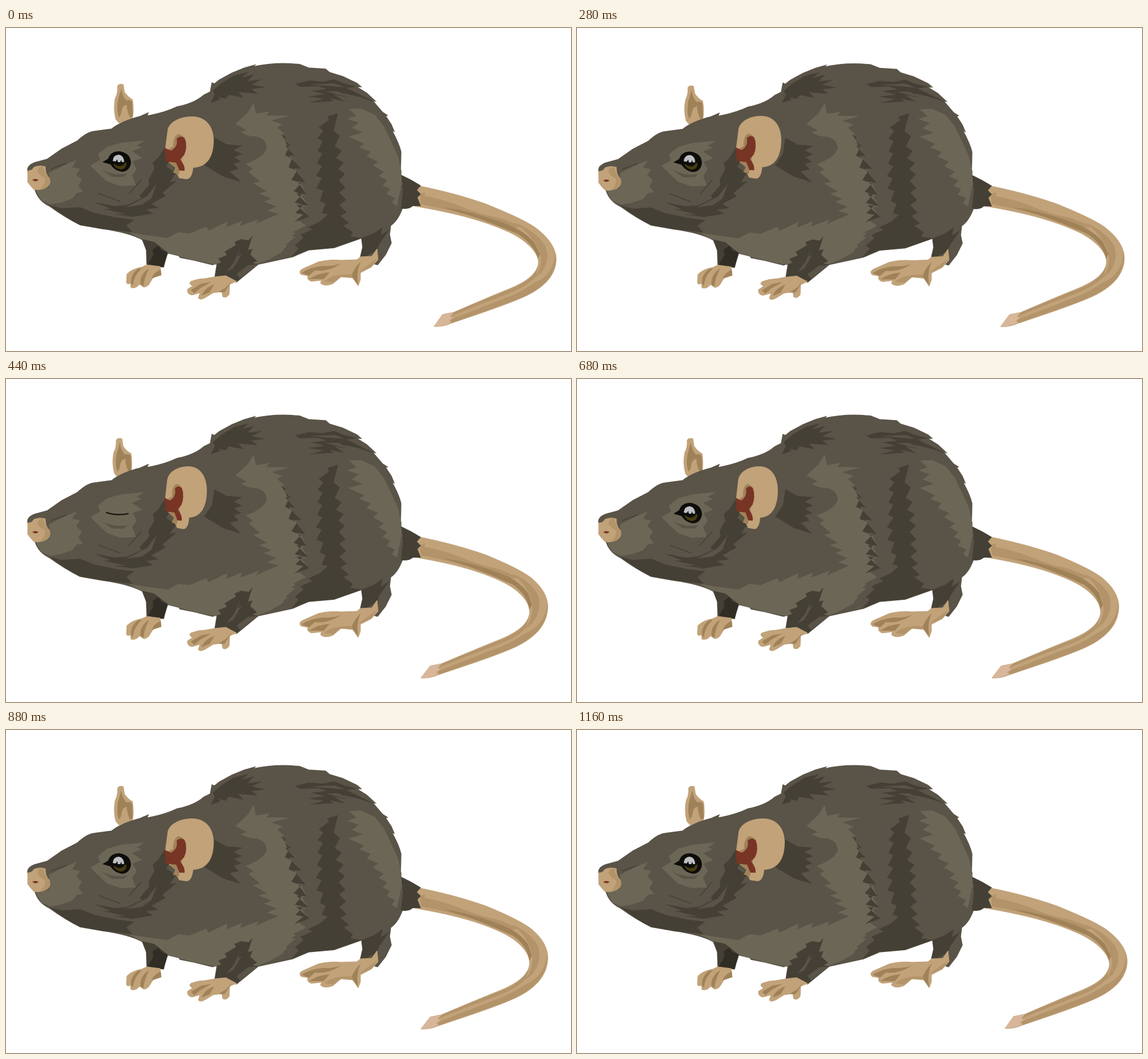
Animation of 990x566 px, one loop 1.2 s. Source, as an HTML page:

```html
<!DOCTYPE html>
<html lang="en">
<head>
<meta charset="utf-8">
<title>Rat</title>
<style>
html, body { margin: 0; width: 100%; height: 100%; overflow: hidden; background: #fff }
svg { display: block; width: 990px; height: 566px }
.mid { fill: #5a5347 }
.light { fill: #6c6656 }
.dark { fill: #454035 }
.deep { fill: #302d25 }
.tan { fill: #c1a279 }
.shade { fill: #a08259 }
.soft { fill: #b3946a }
.pink { fill: #d8b69a }
.red { fill: #783424 }
.coat { stroke: #5a5347; stroke-width: 1.5 }
.skin { stroke: #c1a279 }
.hair { fill: none; stroke: #454035; stroke-width: 1.5 }
</style>
</head>
<body>
<svg viewBox="0 0 990 566">
  <g id="tail">
    <path class="tan skin" d="M715,275 C757,283 800,294 840,308 C872,321 905,335 925,348 C952,367 965,388 964,408 C962,436 940,456 910,470 C872,487 825,502 781,517 Q765,524 750,523 L765,502 L785,498 C815,485 845,472 872,461 C911,446 930,432 933,412 C934,394 912,372 880,357 C832,335 775,322 715,312Z"/>
    <path class="soft" d="M725,291 L735,288 L733,294 Q775,302 808,317 L835,326 L866,333 L905,348 L890,350 Q858,340 838,336 L805,327 Q765,316 727,309Z"/>
    <path class="shade" d="M765,314 L790,318 Q832,327 868,340 Q904,352 925,375 L936,396 L932,404 Q926,380 897,361 Q852,342 808,327Z"/>
    <path class="soft" d="M890,340 Q928,356 944,380 Q955,405 939,428 L927,438 Q944,410 933,388 Q921,361 890,340Z"/>
    <path class="soft" d="M962,392 Q962,432 925,447 Q902,464 870,475 L779,511 L781,517 L885,480 Q929,465 951,440 Q967,416 962,392Z"/>
    <path class="soft" d="M780,505 Q827,485 873,468 Q914,453 929,435 L932,418 Q921,446 875,461 L785,498Z"/>
    <path class="pink" d="M750,523 L765,502 L785,498 L778,505 L783,508 L776,513 L780,516 Q765,524 750,523Z"/>
  </g>

  <g id="body">
  <g id="farEar">
    <path class="tan" d="M192,161 Q187,142 191,124 Q196,115 195,103 Q198,97 206,100 L208,113 Q214,122 222,126 Q225,145 222,159 L198,168Z"/>
    <path class="shade" d="M202,107 Q204,121 211,128 Q217,126 221,130 L222,156 L217,158 Q211,143 212,136 Q203,135 202,151 L198,158 Q193,147 196,128Z"/>
  </g>

  <path class="mid coat" d="M38,251 Q37,242 50,237 L72,231 L98,213 L125,199 Q142,183 155,182 L185,178 Q203,164 235,156 L249,150 L247,155 Q277,150 300,139 Q330,133 346,119 L358,113 L361,97 L365,99 L374,92 L396,80 L418,71 L436,66 L433,69 Q473,60 515,65 L530,71 L560,73 L567,79 L590,86 L615,98 L622,104 L614,104 L632,115 L647,129 L642,128 L660,149 L668,154 L665,155 L675,170 L680,182 L676,180 Q689,204 692,218 L691,260 L697,310 Q688,338 674,347 L672,363 L675,378 L665,398 L651,416 L620,407 L625,385 L623,369 L575,386 L530,390 L502,402 L442,415 L404,446 L366,438 L370,413 L362,416 L330,408 L305,403 L303,400 L282,395 L276,420 L247,416 L246,390 L239,372 Q215,359 170,353 L130,346 Q105,334 76,313 Q57,304 51,285Z"/>

  <!-- snout, eye area and throat -->
  <path class="light" d="M75,255 L105,240 L124,232 L116,245 L130,248 L123,258 L133,267 L127,278 L135,288 L124,290 L116,300 L96,307 L77,310 L62,303 L52,286 L75,281 L77,267Z"/>
  <path class="light" d="M148,242 L165,232 L161,222 L177,209 L202,202 L243,198 L229,207 L238,210 L221,217 L239,229 L222,235 L229,248 L221,260 L228,277 L200,278 L177,270 L161,255Z"/>
  <path class="mid" d="M167,249 Q190,261 213,256 L206,262 L186,262Z"/>
  <path class="dark" d="M75,311 L97,317 L130,315 L155,325 L193,333 L225,337 L211,347 L222,359 L170,353 L130,346 Q105,334 75,311Z"/>
  <path class="dark" d="M278,211 L267,228 L257,237 L260,248 L250,266 L251,276 L234,295 L238,299 L213,311 L190,313 L154,306 L184,318 L170,318 L210,327 L188,327 L222,332 L258,326 L245,319 L267,316 L255,309 L280,295 L274,290 L299,269 L287,271 L298,255 L281,244 L288,230Z"/>
  <path class="mid" d="M210,315 L247,296 L264,274 L255,299 L238,311Z"/>
  <path class="hair" d="M79,248 L106,238 M162,291 L200,305 M237,267 L215,292"/>

  <!-- shoulder and belly -->
  <path class="light" d="M402,169 L423,150 L434,132 L438,151 L462,147 L456,154 L496,155 L465,163 L485,170 L475,175 L488,187 L481,188 L500,208 L491,208 L506,225 L498,226 L518,248 L507,248 L525,272 L516,271 L527,293 L518,295 L530,312 L518,315 L532,334 L514,339 L526,347 L503,359 L513,362 L490,381 L497,386 L462,406 L442,414 L370,416 L330,408 L282,395 L239,372 L215,359 L240,363 L283,369 L302,359 L322,361 L351,349 L355,356 L388,340 L386,350 L414,339 L410,348 L443,336 L438,344 L477,327 L457,321 L474,314 L452,305 L465,300 L443,291 L457,287 L433,273 L445,270 L425,253 L433,248 L420,239 Q452,228 457,211 Q455,194 438,191 Q425,192 411,183 L422,180Z"/>
  <path class="dark" d="M484,188 L490,192 L488,197 L500,208 L489,207 L506,225 L496,225 L518,248 L505,247 L525,272 L511,270 L527,293 L509,291 L530,312 L509,311 L532,332 L505,341 L521,328 L507,325 L521,311 L506,307 L518,293 L504,287 L517,273 L500,267 L510,251 L495,245 L501,230 L489,224 L495,211Z"/>
  <path class="mid" d="M532,331 L514,339 L526,347 L500,366 L511,367 L487,388 L479,406 L502,402 L530,388 L560,355Z"/>

  <!-- back and flank markings -->
  <path class="dark" d="M359,132 L366,117 L362,111 L377,98 L400,84 L425,78 L413,88 L435,82 L423,94 L449,91 L430,100 L455,105 L430,108 L441,116 L407,113 L416,123 L390,118 L385,125 L372,122 L376,126Z"/>
  <path class="dark" d="M507,99 L531,93 L555,95 L575,91 L592,98 L616,104 L596,106 L623,119 L647,131 L620,122 L592,115 L598,122 L575,118 L594,130 L567,124 L574,129 L531,132 L557,125 L529,121 L559,117 L535,111 L562,108 L547,103 L515,104Z"/>
  <path class="mid" d="M532,100 L576,98 L594,105 L570,103Z M560,112 L582,112 L606,123 L586,119Z"/>
  <path class="dark" d="M365,193 L387,205 L414,207 L399,215 L414,222 L400,227 L412,235 L399,239 L408,248 L392,252 L412,271 L380,261 L347,241 L361,221Z"/>
  <path class="dark" d="M582,150 L563,156 L566,162 L548,175 L556,181 L546,194 L555,199 L546,216 L554,221 L545,238 L554,243 L543,260 L553,264 L544,282 L556,286 L550,304 L560,309 L553,325 L564,328 L550,340 L529,350 L537,354 L516,363 L521,369 L506,382 L513,387 L500,402 L530,390 L575,386 L624,369 L603,366 L608,359 L591,347 L601,343 L586,330 L597,324 L584,311 L596,302 L584,289 L595,281 L583,268 L594,257 L582,248 L592,237 L578,229 L588,216 L576,208 L585,190 L574,181Z"/>
  <path class="light" d="M601,143 L622,142 L646,153 L662,173 L675,200 L687,226 L693,252 L692,280 L685,313 L676,307 L682,299 L667,292 L673,283 L660,277 L668,268 L653,260 L662,253 L643,242 L652,235 L632,226 L639,218 L619,210 L628,204 L600,191 L625,184 L606,176 L618,167 L598,160 L614,155Z"/>
  <path class="dark" d="M692,258 L710,267 L727,277 L720,285 L727,292 L721,298 L727,313 L713,313 Q705,320 692,317 L695,290Z"/>
  <path class="dark" d="M623,369 L644,361 L660,350 L657,364 L672,354 L654,380 L650,391 L620,407 L625,385Z"/>

  <!-- front legs -->
  <path class="dark" d="M239,371 L260,376 L284,395 L276,420 L247,417 L246,390Z"/>
  <path class="deep" d="M267,382 L272,390 L283,394 L276,420 L248,416 L258,399 L257,389Z"/>
  <path class="dark" d="M432,365 L425,373 L412,371 L400,376 L403,381 L383,393 L387,399 L372,405 L377,412 L370,414 L366,438 L386,435 L404,446 L442,415 L432,413 L440,409 L428,398 L432,388 L424,390Z"/>
  <path class="mid" d="M410,388 L406,402 L413,397 L398,422 L386,428 L400,411Z M442,415 L424,417 L404,432 L410,440Z"/>

  <!-- paws -->
  <path class="tan skin" d="M247,416 L270,419 L272,434 L258,438 L250,451 Q242,458 238,453 L234,450 Q228,458 219,456 L218,448 Q211,452 211,445 L212,432 Q221,423 238,420Z"/>
  <path class="shade" d="M219,448 Q218,433 231,423 L238,422 Q224,434 222,453Z M236,451 Q233,438 245,426 L251,422 Q242,438 241,453Z M255,440 Q259,429 271,424 L272,434Z"/>
  <path class="tan skin" d="M366,437 L385,435 L404,445 L392,450 L391,468 Q386,475 380,472 L378,463 L363,465 L350,473 Q340,479 337,474 L340,465 L326,469 Q317,468 318,459 L327,453 Q319,449 324,445 Q337,440 349,440Z"/>
  <path class="shade" d="M324,460 L342,449 L360,446 L340,457 L330,466Z M343,470 Q347,457 365,450 L357,464Z M372,464 L386,455 L397,443 L392,450 L383,464Z"/>
  <path class="tan skin" d="M650,388 L652,407 L640,420 L621,430 L621,442 L617,453 L608,439 L587,437 L573,449 Q558,455 551,448 L553,443 L535,445 Q526,442 529,435 L517,433 Q511,426 522,422 L547,411 Q566,406 588,408 L615,407 L621,402 L641,401Z"/>
  <path class="shade" d="M518,430 Q533,420 555,418 Q576,419 588,413 Q565,429 541,426 L531,435Z M531,441 Q548,430 567,429 L557,441Z M605,436 Q610,421 622,410 Q613,427 617,451Z"/>
  <path class="soft" d="M558,445 Q573,431 606,433 L608,438 L587,437 L573,447Z M617,429 L651,404 L640,420Z"/>

  <g id="nearEar">
    <path class="tan" d="M279,211 L283,181 C285,166 304,156 326,156 C350,156 364,173 364,198 C364,226 353,245 328,246 C327,258 323,266 316,266 L303,264 Q300,255 294,253 L297,246 L286,237Z"/>
    <path class="shade" d="M280,216 L293,209 Q292,193 301,187 Q313,188 316,202 L307,235 L312,252 L304,249 L303,258 L292,254 L298,247 L288,238Z"/>
    <path class="red" d="M278,211 L289,216 Q302,209 299,195 Q306,188 313,194 Q319,210 312,224 L305,231 Q314,242 313,251 L304,251 L298,237 L280,235Z"/>
  </g>

  <g id="nose">
    <path class="tan skin" d="M38,251 Q45,252 49,245 Q58,241 69,244 Q68,256 76,264 Q80,275 70,281 Q58,286 49,284 Q42,277 38,271Z"/>
    <path class="soft" d="M65,243 Q68,257 76,264 Q80,276 70,281 L59,284 Q70,275 68,264 Q58,260 55,251 Q57,244 65,243Z"/>
    <path class="red" d="M46,267 Q51,264 57,267 Q52,272 46,267Z"/>
  </g>

  <g id="open">
    <path fill="#0d0d09" d="M169,236 L179,230 Q183,217 199,217 Q218,220 219,237 Q217,252 203,253 Q190,251 183,240Z"/>
    <path fill="#453a10" d="M188,239 Q201,243 211,236 Q212,248 201,249 Q191,247 188,239Z"/>
    <ellipse cx="199" cy="238" rx="8" ry="5" fill="#0d0d09"/>
    <path fill="#bfc0c3" d="M187,234 Q188,223 198,223 Q207,225 207,236 L203,236 L202,232 L200,236 L196,236 L195,231 L192,235Z"/>
  </g>
  <g id="closed">
    <path class="light" d="M170,232 Q181,216 199,215 Q218,222 219,238 Q209,251 194,248Z"/>
    <path d="M176,234 Q193,240 214,236" fill="none" stroke="#11110c" stroke-width="2.2" stroke-linecap="round"/>
  </g>
  </g>
</svg>
<script>
const LOOP = 1200, STEP = 40;
const get = id => document.getElementById(id);
const [body, farEar, nearEar, nose, open, closed] =
  ['body', 'farEar', 'nearEar', 'nose', 'open', 'closed'].map(get);
const tail = [...get('tail').children].map(el => ({ el, d: el.getAttribute('d') }));

const ramp = (v, from, to) => Math.min(1, Math.max(0, (v - from) / (to - from)));
const move = (el, x, y, sx = 1) =>
  el.setAttribute('transform', `translate(${x} ${y}) scale(${sx} 1)`);

// The swing grows from the fixed root towards the tip.
function bendTail(p) {
  for (const { el, d } of tail) {
    el.setAttribute('d', d.replace(/(\d+),(\d+)/g, (_, x, y) => {
      const shift = 15 * ramp(y, 320, 400) + 8 * ramp(y, 400, 523);
      return `${x - p * shift},${+y + p * ramp(y, 400, 523)}`;
    }));
  }
}

function draw(now) {
  const t = Math.floor(now % LOOP / STEP) * STEP;
  const head = ramp(t, 160, 400) - ramp(t, 680, 880);
  const shut = t >= 440 && t < 680;
  const sx = 1 - 0.14 * head;

  bendTail(ramp(t, 200, 440) - ramp(t, 920, 1160));
  move(body, 0, head - 1);
  move(farEar, -2.5 * head, 4.5 * head);
  move(nearEar, 278 * (1 - sx), -3 * head, sx);
  move(nose, 0, head);
  open.style.display = shut ? 'none' : '';
  closed.style.display = shut ? '' : 'none';
  requestAnimationFrame(draw);
}
draw(performance.now());
</script>
</body>
</html>
```
